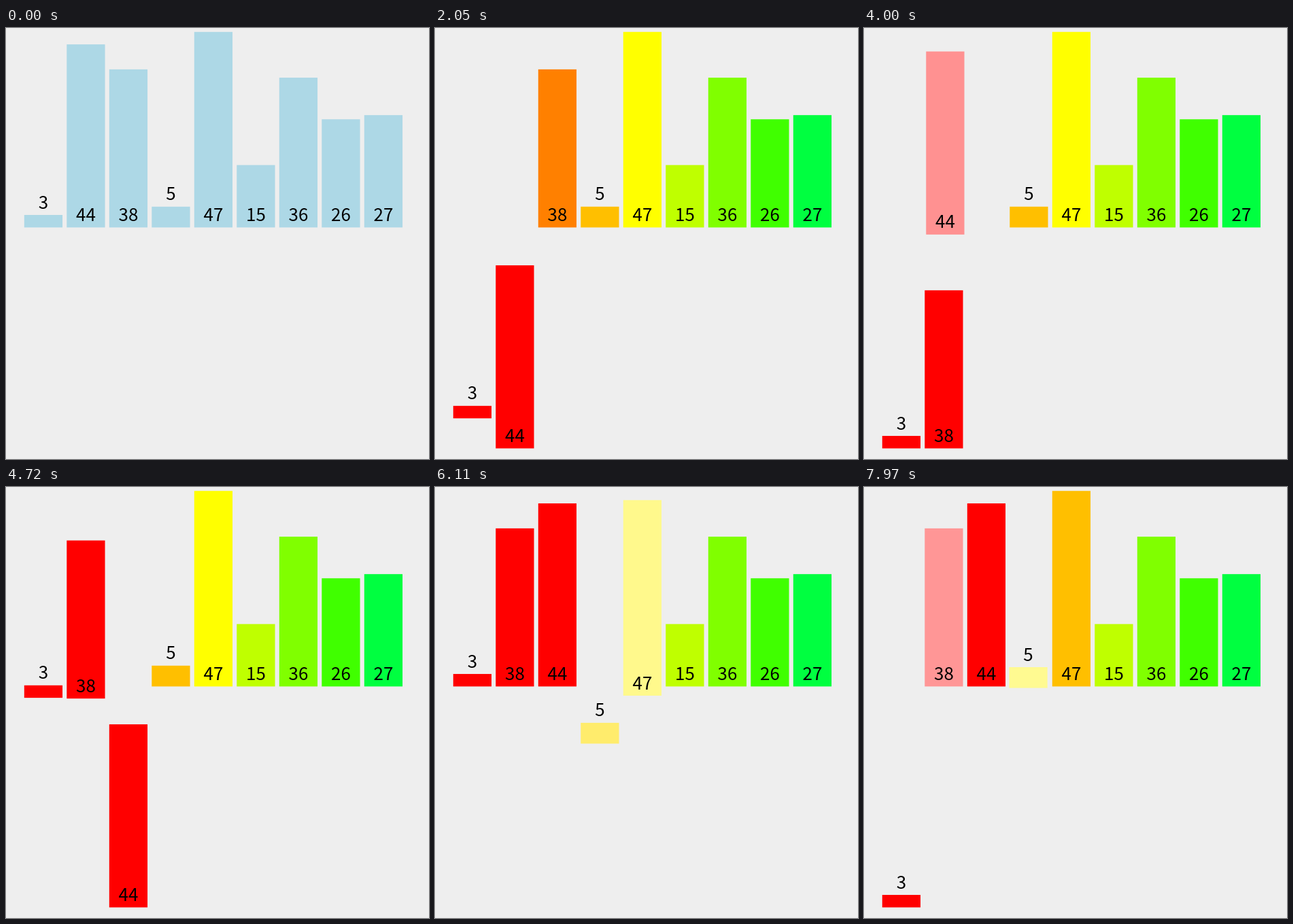
Write an HTML page that moves like this. It is 622 px wide and 634 px high and loops after 8000 ms.

```html
<!DOCTYPE html>
<html lang="en">
<head>
<meta charset="utf-8">
<title>Merge sort</title>
<style>
  html, body { margin: 0; width: 100%; height: 100%; overflow: hidden; background: #eee; }
  svg { display: block; }
  text { font: 26px "Noto Sans CJK SC", "Noto Sans CJK JP", "Open Sans", sans-serif; text-anchor: middle; }
</style>
</head>
<body>
<svg id="stage" width="622" height="634" viewBox="0 0 622 634"></svg>
<script>
const LOOP = 8000, EASE_MS = 250;
const TICK = 77.8, FIRST_TICK = 500;
const LEFT = 26.8, PITCH = 62.5, WIDTH = 56.25, BASE = 293.4, DROP = 325, UNIT = 6.12;

const values = [3, 44, 38, 5, 47, 15, 36, 26, 27];
const BLUE = [173, 216, 230], RED = [255, 0, 0], AMBER = [255, 191, 0];
const PALE_RED = [255, 150, 150], PALE_YELLOW = [255, 252, 146];
const rainbow = [
  RED, [255, 64, 0], [255, 128, 0], AMBER, [255, 255, 0],
  [191, 255, 0], [128, 255, 0], [64, 255, 0], [0, 255, 64]
];

// Pose changes for one bar; omitted properties keep their value.
const tint = color => ({ color });
const down = (slot, color) => ({ slot, drop: 1, color });
const up = { drop: 0 };

// Each step: start time, then changes keyed by bar value.
const steps = [
  [460, Object.fromEntries(values.map((v, i) => [v, tint(rainbow[i])]))],
  [985, { 3: tint(PALE_RED), 44: tint([255, 214, 150]) }],
  [1447, { 3: down(0, RED) }],
  [1465, { 44: down(1, RED) }],
  [1975, { 3: up }],
  [2430, { 44: up }],
  [2945, { 3: tint(PALE_RED), 38: tint([255, 232, 149]) }],
  [2955, { 3: down(0, RED), 44: tint(PALE_RED) }],
  [3430, { 38: down(1, RED) }],
  [3951, { 44: down(2, RED) }],
  [4449, { 3: up }],
  [4511, { 38: up }],
  [4975, { 44: up }],
  [5510, { 5: tint(PALE_YELLOW), 47: tint(PALE_YELLOW) }],
  [5951, { 5: down(3, AMBER) }],
  [6047, { 47: down(4, AMBER) }],
  [6455, { 5: up }],
  [6920, { 47: up }],
  [7470, { 3: tint(PALE_RED), 5: tint(PALE_YELLOW) }],
  [7530, { 3: down(0, RED), 38: tint(PALE_RED) }],
  [7939, { 5: down(1, RED) }]
];

const mix = (a, b, k) => a + (b - a) * k;
const ease = f => f < 0.5 ? 4 * f ** 3 : 1 - 4 * (1 - f) ** 3;

function blend(a, b, elapsed) {
  const k = ease(Math.min(1, elapsed / EASE_MS));
  return {
    slot: mix(a.slot, b.slot, k),
    drop: mix(a.drop, b.drop, k),
    color: a.color.map((c, i) => mix(c, b.color[i], k))
  };
}

// A new step restarts the easing from wherever the bar is.
function poseAt(value, index, t) {
  let from = { slot: index, drop: 0, color: BLUE }, to = from, start = 0;
  for (const [time, changes] of steps) {
    if (time > t) break;
    from = blend(from, to, time - start);
    to = { ...to, ...changes[value] };
    start = time;
  }
  return blend(from, to, t - start);
}

const stage = document.getElementById("stage");
function add(name, attrs) {
  const el = document.createElementNS("http://www.w3.org/2000/svg", name);
  for (const key in attrs) el.setAttribute(key, attrs[key]);
  return stage.appendChild(el);
}

const bars = values.map(value => {
  const height = value * UNIT;
  const rect = add("rect", { width: WIDTH, height });
  const label = add("text", {});
  label.textContent = value;
  return { value, height, rect, label };
});

function draw(t) {
  bars.forEach(({ value, height, rect, label }, i) => {
    const { slot, drop, color } = poseAt(value, i, t);
    const x = LEFT + slot * PITCH, bottom = BASE + drop * DROP;
    const top = bottom - height;
    rect.setAttribute("x", x);
    rect.setAttribute("y", top);
    rect.setAttribute("fill", `rgb(${color.map(Math.round)})`);
    label.setAttribute("x", x + WIDTH / 2);
    label.setAttribute("y", (value < 10 ? top : bottom) - 9.4);
  });
}

// The motion advances in even ticks, as a recorded screen does.
const snap = t => Math.max(0, FIRST_TICK + TICK * Math.floor((t - FIRST_TICK) / TICK + 0.2));

const origin = performance.now();
function frame() {
  draw(snap((performance.now() - origin) % LOOP));
  requestAnimationFrame(frame);
}
frame();
</script>
</body>
</html>
```
